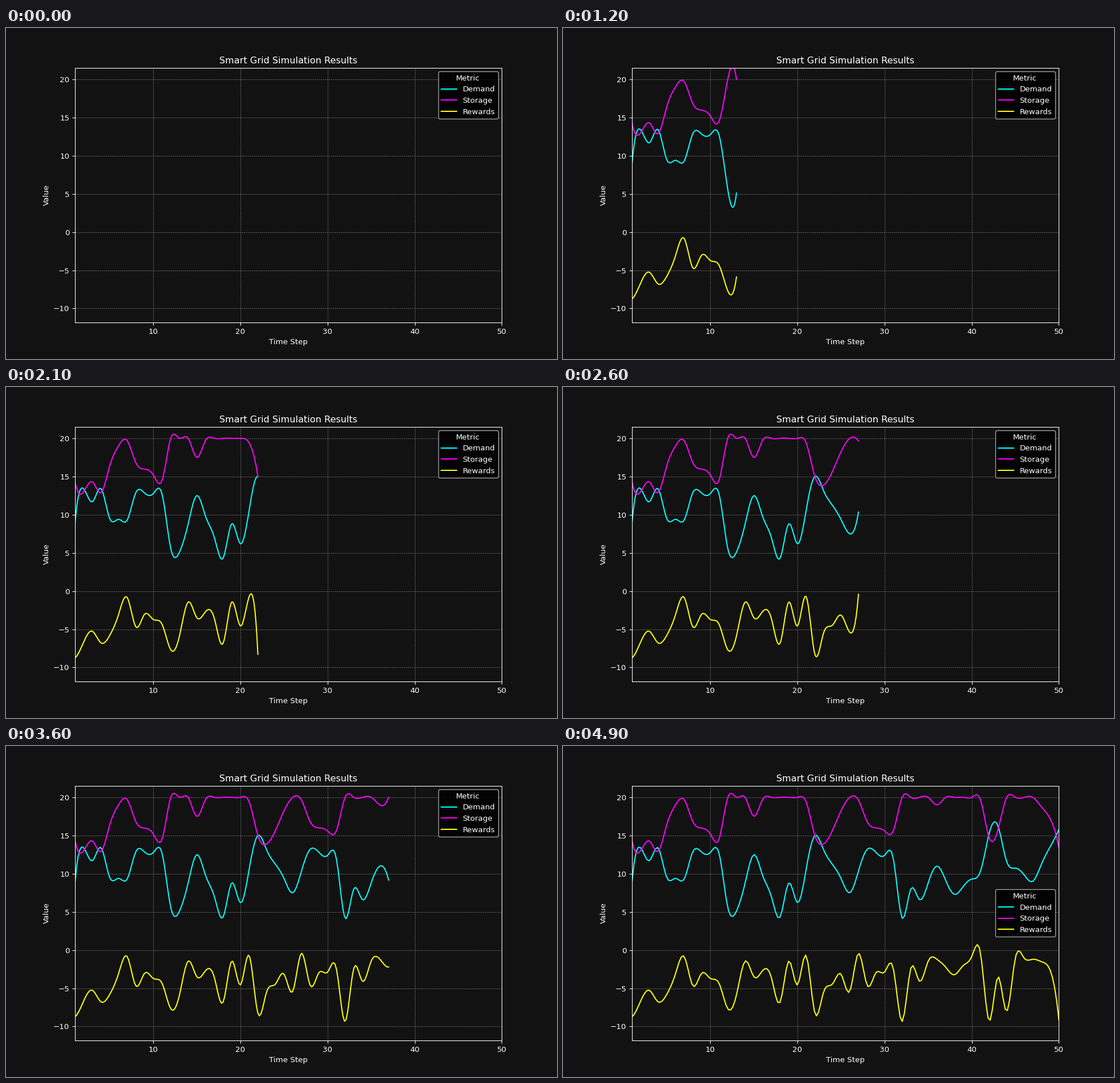
Animation, 966 px wide and 580 px high, one loop 8 s. Source, as a matplotlib script:

```python
import numpy as np
import matplotlib.pyplot as plt
from matplotlib.animation import FuncAnimation

WIDTH, HEIGHT, DPI = 966, 580, 96.6
STEPS = 50
FRAMES, INTERVAL = 80, 100
SAMPLES = 200
LEGEND_EDGE = 42.6  # time step where curves reach the legend
BACKGROUND = "#121212"

CAPACITY = 20
START_STORAGE = 10.1

# Turning points of the demand: (time step, value)
DEMAND_KEYS = [
    (1, 8.7), (2, 13.4), (3, 11.7), (4, 13.4), (5, 9.5), (7, 9.3), (8, 12.9),
    (11, 12.7), (12, 5.6), (13, 5.1), (15, 12.5), (18, 4.3), (19, 8.8),
    (20, 6.2), (22, 15), (26, 7.5), (28, 13.2), (31, 12), (32, 4.2), (33, 8),
    (34, 6.6), (36, 11), (38, 7.3), (41, 10.3), (42, 15.3), (43, 16.3),
    (44, 11.6), (47, 9), (50, 15.8),
]


def supply(stored, last_demand):
    """Grid output: higher when storage is low or demand has just peaked."""
    if last_demand > 15.2:
        return last_demand + 2
    if stored >= 18.8:
        return max(10, last_demand)
    return 12 if stored >= 14 else 13


def simulate():
    demand = np.interp(np.arange(1, STEPS + 1), *zip(*DEMAND_KEYS))
    storage, rewards = [], []
    stored, last = START_STORAGE, 0
    for need in demand:
        output = supply(stored, last)
        stored = min(CAPACITY, stored + output - need)
        storage.append(stored)
        rewards.append(-1.2 * abs(output - need) - max(0, 18 - stored))
        last = need
    return demand, np.array(storage), np.array(rewards)


def smooth(y):
    """Not-a-knot cubic spline through y at 1, 2, ..., len(y)."""
    n = len(y)
    if n < 4:
        return np.arange(1, n + 1), y
    a = 4 * np.eye(n) + np.eye(n, k=1) + np.eye(n, k=-1)
    a[0] = a[-1] = 0
    a[0, :3] = a[-1, -3:] = 1, -2, 1
    b = np.zeros(n)
    b[1:-1] = 6 * np.diff(y, 2)
    m = np.linalg.solve(a, b)

    u = np.linspace(0, n - 1, SAMPLES)
    i = np.minimum(u.astype(int), n - 2)
    t = u - i
    s = 1 - t
    bend = (s**3 - s) * m[i] + (t**3 - t) * m[i + 1]
    return u + 1, s * y[i] + t * y[i + 1] + bend / 6


plt.rcParams.update({
    "font.family": "DejaVu Sans",
    "text.color": "white",
    "axes.labelcolor": "white",
    "axes.edgecolor": "white",
    "xtick.color": "white",
    "ytick.color": "white",
})

fig, ax = plt.subplots(figsize=(WIDTH / DPI, HEIGHT / DPI), dpi=DPI)
fig.set_facecolor(BACKGROUND)
ax.set_facecolor(BACKGROUND)
ax.set_xlim(1, STEPS)
ax.set_ylim(-11.85, 21.52)
ax.grid(True, color="gray", linestyle="--", linewidth=0.5)
ax.set_title("Smart Grid Simulation Results")
ax.set_xlabel("Time Step")
ax.set_ylabel("Value")

series = simulate()
styles = [("Demand", "cyan"), ("Storage", "magenta"), ("Rewards", "yellow")]
lines = [ax.plot([], [], color=color, label=name)[0] for name, color in styles]
legend = ax.legend(title="Metric", loc="upper right",
                   facecolor="black", edgecolor="0.8")


def update(frame):
    n = min(frame + 1, STEPS)
    for line, values in zip(lines, series):
        line.set_data(*smooth(values[:n]))
    legend.set_loc("center right" if n > LEGEND_EDGE else "upper right")
    return lines


anim = FuncAnimation(fig, update, frames=FRAMES, interval=INTERVAL,
                     repeat=True, repeat_delay=0)
plt.show()
```
